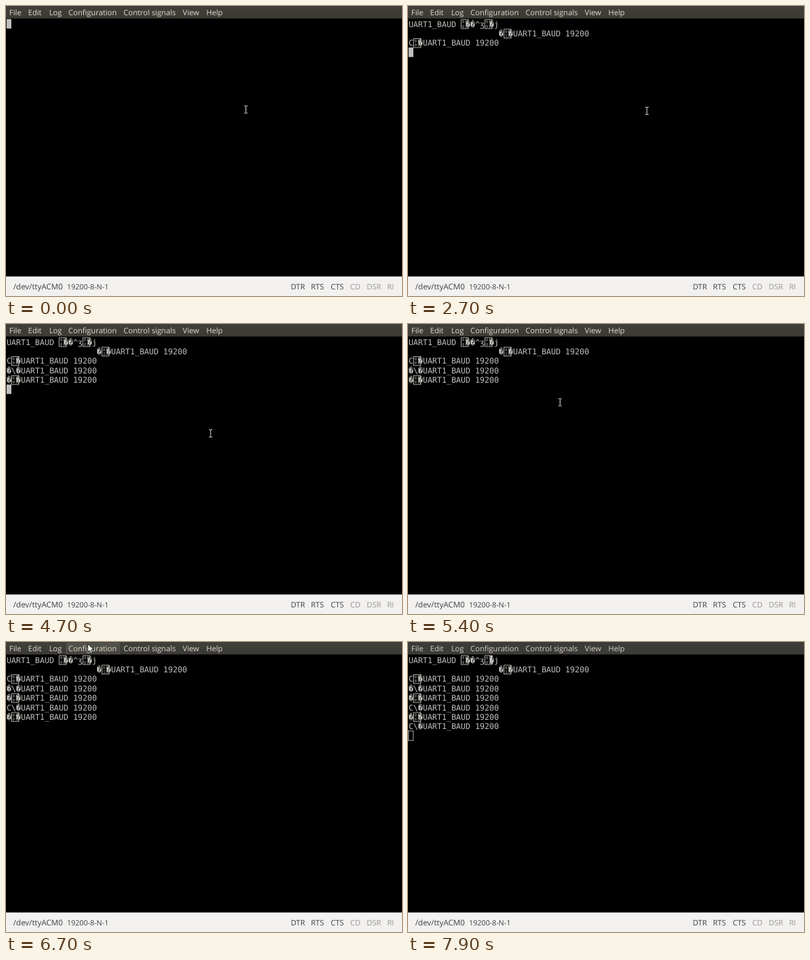
Recreate the animation shown at these times as an HTML page. Size 600 by 440 pixels, loop 8 s.

```html
<!DOCTYPE html>
<html lang="en">
<head>
<meta charset="utf-8">
<title>Serial terminal</title>
<style>
  html, body { margin: 0; width: 100%; height: 100%; overflow: hidden; background: #000; }
  svg { display: block; width: 600px; height: 440px; text-rendering: geometricPrecision; }
  .ui { font-family: "Open Sans", "Noto Sans", sans-serif; font-size: 11.5px; }
  .mono { font-family: "DejaVu Sans Mono", monospace; font-size: 11.96px; fill: #c0c0bc; white-space: pre; }
  .hex { font-family: "DejaVu Sans Mono", monospace; font-size: 5.6px; fill: #b4b4b0; }
</style>
</head>
<body>
<svg id="stage" viewBox="0 0 600 440">
  <defs>
    <linearGradient id="barFill" x2="0" y2="1">
      <stop stop-color="#403f3a"/><stop offset="1" stop-color="#3b3a35"/>
    </linearGradient>
    <linearGradient id="hoverFill" x2="0" y2="1">
      <stop stop-color="#55534d"/><stop offset="1" stop-color="#45433e"/>
    </linearGradient>
  </defs>
  <rect width="600" height="440"/>
  <rect id="bar" width="600" height="18.9" fill="url(#barFill)"/>
  <path id="hover" d="M91.4 18.9V3.4q0-2 2-2H170.3q2 0 2 2V18.9" fill="url(#hoverFill)" stroke="#5b5952" stroke-width=".9"/>
  <g id="menu" class="ui" fill="#dfdbd2"></g>
  <rect y="410.4" width="600" height="29.6" fill="#f2f1f0"/>
  <g id="status" class="ui"></g>
  <g id="lines"></g>
  <rect id="caret"/>
  <path id="beam" fill="none" stroke="#e4e4e4" stroke-width="1"
        d="M-2.5-5.5H-.8L0-5L.8-5.5H2.5M0-5V5M-2.5 5.5H-.8L0 5L.8 5.5H2.5"/>
  <path id="arrow" fill="#fff" stroke="#111" stroke-width=".8"
        d="M0 0V12.2L2.8 9.6L4.7 14L6.8 13L4.9 8.8H8.6Z"/>
</svg>
<script>
const LOOP = 8000, STEP = 100, COL = 7.2, ROW = 14.4, LEFT = 0.9, TOP = 19.8, ASCENT = 11.7;
const $ = id => document.getElementById(id);

function add(parent, tag, attrs, text) {
  const el = document.createElementNS("http://www.w3.org/2000/svg", tag);
  for (const key in attrs) el.setAttribute(key, attrs[key]);
  if (text) el.textContent = text;
  parent.appendChild(el);
  return el;
}

function set(el, attrs) {
  for (const key in attrs) el.setAttribute(key, attrs[key]);
}

const show = (el, on) => el.setAttribute("visibility", on ? "visible" : "hidden");
const colX = col => LEFT + col * COL;
const rowY = row => TOP + row * ROW;

[["File", 5], ["Edit", 33.5], ["Log", 65.4], ["Configuration", 94.5],
 ["Control signals", 178], ["View", 267.8], ["Help", 303.5]]
  .forEach(([label, x]) => add($("menu"), "text", { x, y: 14.4 }, label));

[["DTR", 431.5, 1], ["RTS", 462, 1], ["CTS", 492, 1], ["CD", 521.5], ["DSR", 546.5], ["RI", 577.5]]
  .forEach(([label, x, on]) =>
    add($("status"), "text", { x, y: 430, fill: on ? "#404040" : "#989694" }, label));
add($("status"), "text", { x: 11, y: 430, fill: "#404040", style: "font-size:11.9px" }, "/dev/ttyACM0");
add($("status"), "text", { x: 92.5, y: 430, fill: "#404040", style: "font-size:11px" }, "19200-8-N-1");

// "#" marks an unprintable byte, drawn as a hex box; "?" an invalid one.
const baud = "UART1_BAUD 19200";
const rows = ["UART1_BAUD #??^ʒ#?j", " ".repeat(19) + "?#?" + baud,
  ...["C#?", "?\\?", "?#?", "C\\?", "?#?", "C\\?"].map(head => head + baud)];

function addHexBox(group, x, y, digits) {
  add(group, "rect", { x: x + 0.45, y: y + 0.9, width: 10.8, height: 13.5, fill: "#000", stroke: "#c0c0bc", "stroke-width": 0.9 });
  [...digits].forEach((digit, i) =>
    add(group, "text", { class: "hex", x: x + 2 + i % 2 * 4.5, y: y + 6.6 + (i >> 1) * 6.2 }, digit));
}

const lines = rows.map((row, r) => {
  const group = add($("lines"), "g", {});
  const y = rowY(r);
  [...row].forEach((ch, c) => {
    if (ch === "#") addHexBox(group, colX(c), y, r % 2 ? "001C" : "000C");
  });
  add(group, "text", { class: "mono", x: LEFT, y: y + ASCENT },
    row.replace(/[# ]/g, "\u00a0").replace(/\?/g, "\ufffd"));
  return group;
});

// Pointer path: time, x, y
const path = [
  [0, 363.5, 157], [1700, 363.5, 157], [1900, 362, 159], [3200, 362, 159],
  [4100, 330, 166.5], [4500, 310, 166], [4700, 310, 166], [5500, 219, 112],
  [5900, 134, 42.5], [6100, 126, 22], [6200, 124, 12], [6300, 124, 15],
  [6400, 124, 20], [6600, 124, 22], [6700, 124, 3], [6800, 124, 5],
  [7200, 124, 5], [7800, 126, 27], [8000, 126, 27]
];

function pointerAt(t) {
  const i = path.findIndex(p => p[0] > t);
  const [t0, x0, y0] = path[i - 1], [t1, x1, y1] = path[i];
  const k = (t - t0) / (t1 - t0);
  return [x0 + (x1 - x0) * k, y0 + (y1 - y0) * k];
}

function render(now) {
  const t = Math.floor(now % LOOP / STEP) * STEP;
  const count = Math.floor((t + 300) / 1000);
  const focused = t < 7900;
  lines.forEach((line, r) => show(line, r < count));

  const lit = t < 500 || (t >= 1100 && (t + 100) % 1200 < 600);
  const x = colX(count === 1 ? 19 : 0), y = rowY(count);
  show($("caret"), lit || !focused);
  set($("caret"), focused
    ? { x, y, width: COL, height: ROW, fill: "#c0c0c0", stroke: "none" }
    : { x: x - 0.45, y: y - 0.1, width: 7.6, height: ROW, fill: "none", stroke: "#c0c0c0", "stroke-width": 0.9 });

  const [px, py] = pointerAt(t);
  const onMenu = py < 19;
  show($("hover"), onMenu);
  show($("arrow"), onMenu);
  show($("beam"), !onMenu);
  set(onMenu ? $("arrow") : $("beam"), { transform: `translate(${px} ${py})` });
  set($("bar"), { fill: focused ? "url(#barFill)" : "#3c3b37" });
  set($("menu"), { fill: focused ? "#dfdbd2" : "#d3cfc6" });
}

const start = performance.now();
function tick() {
  render(performance.now() - start);
  requestAnimationFrame(tick);
}
tick();
</script>
</body>
</html>
```
